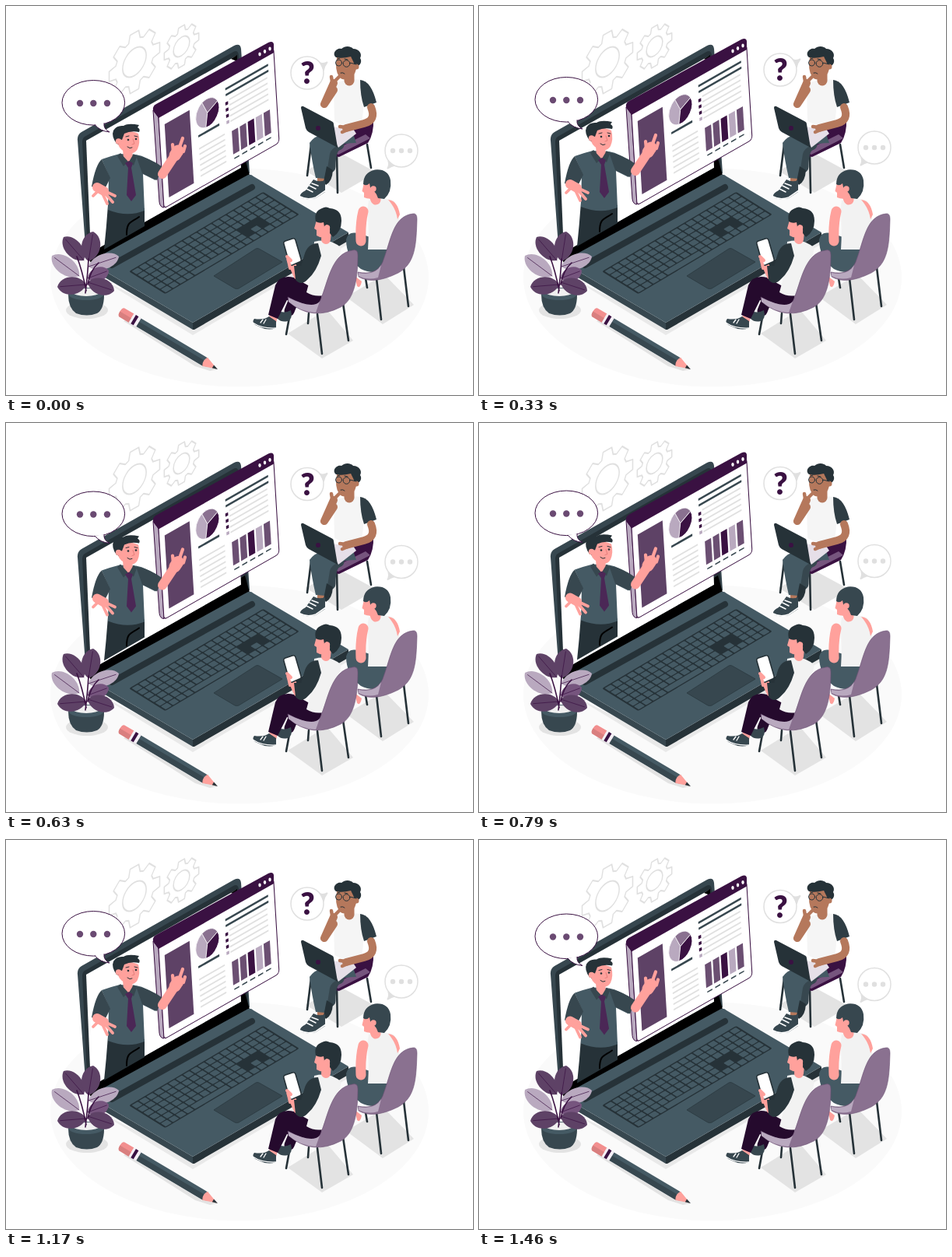
These frames come from a looping animation (600x500 px, 1500 ms). An HTML page:

```html
<!DOCTYPE html>
<html lang="en">
<head>
<meta charset="utf-8">
<title>Online presentation</title>
<style>
html, body { margin: 0; height: 100%; overflow: hidden; background: #fff; }
svg { display: block; width: 600px; height: 500px; }
.line { fill: none; stroke-linecap: round; stroke-linejoin: round; }
.skin { stroke: #ffa19c; }
.brown { stroke: #b5785c; }
.leg { stroke: #263238; stroke-width: 2.6; }
.grey { stroke: #e0e0e0; }
</style>
</head>
<body>
<svg viewBox="0 0 600 500">
  <ellipse cx="300" cy="349" rx="243" ry="140.5" fill="#fafafa"/>

  <!-- floor shadows -->
  <g fill="#e3e3e3">
    <path d="M385 212L428 188L476 214L431 240Z"/>
    <path d="M437 374L486 345L524 384L484 409Z"/>
    <path d="M362 421L412 390L446 430L406 453Z"/>
    <path d="M120 350L240 423L440 306V298L240 410Z" opacity=".7"/>
    <ellipse cx="104" cy="391" rx="27" ry="11"/>
    <path d="M151 405L163 400L272 467L262 469L243 463Z"/>
  </g>

  <g id="gears" class="line grey" stroke-width="1.800"></g>

  <!-- laptop -->
  <path d="M92 173Q91 166 97 162L293 51Q301 47 302 55L313 215L103 322Z" fill="#37474f"/>
  <path d="M98 175Q98 170 101 168L292 59Q298 56 299 63L311 212L105 323Z" fill="#263238"/>
  <path d="M103 173L296 64L302 208L109 317Z" fill="#fff"/>
  <path d="M289 68L297 63V71Z" fill="#000"/>
  <path d="M109 317L302 208V199L307 196L313 218V224L112 335L105 323Z" fill="#000"/>
  <path d="M117 335L240 407V416L122 346Z" fill="#37474f"/>
  <path d="M240 407L440 291V299Q440 302 436 304L242 416H240Z" fill="#263238"/>
  <path d="M117 335L112 326L311 217Q315 216 318 219L440 291L240 407Z" fill="#455a64"/>
  <path d="M136 333L316 233" class="line" stroke="#263238" stroke-width="8"/>
  <g id="keys" transform="matrix(1.133 -.673 .75 .467 160 341)">
    <rect x="-1" y="-1" width="152" height="62" rx="2" fill="#263238"/>
  </g>
  <path d="M267 347L321 312Q323 311 325 312L355 329L299 363Q297 364 294 363Z" fill="#37474f" stroke="#2e3d44"/>

  <!-- floating window and presenter -->
  <g class="float">
    <path d="M189 134L196 143L203 259Q198 259 197 252Z" fill="#b9a9bf" stroke="#3a1142"/>
    <g id="window" transform="matrix(1 -.57 .06 1 196 143)">
      <path d="M0 -1H148V112Q148 117 143 117H4Q0 117 0 113Z" fill="#fff" stroke="#3a1142"/>
      <rect x="7" y="13" width="32" height="94" fill="#5e4266"/>
      <g transform="translate(61 29) scale(1 1.18)" stroke="#fff" stroke-width=".7">
        <circle r="15" fill="#b9a9bf"/>
        <path d="M0 0L-6 -13.7A15 15 0 0 1 13.500 -6.500Z" fill="#8a7190"/>
        <path d="M0 0L13.500 -6.500A15 15 0 0 1 -3 14.700Z" fill="#3a1142"/>
      </g>
      <path d="M48 52H75M85 12.500H140M85 20H140" stroke="#37474f" stroke-width="2.800"/>
    </g>
    <path d="M189 134Q188 129 193 126L337 47Q343 44 344 49V60L196 144Z" fill="#3a1142"/>
    <g fill="#fff"><ellipse cx="326" cy="62" rx="1.700" ry="2.400"/><ellipse cx="332.500" cy="58.500" rx="1.700" ry="2.400"/><ellipse cx="339" cy="55" rx="1.700" ry="2.400"/></g>

    <path d="M131 256L178 260V283L126 313Q129 285 131 256Z" fill="#263238"/>
    <path d="M155 294C155 277 160 279 171 271" class="line" stroke="#000" stroke-width="2"/>
    <path d="M123 197Q134 193 146 190L167 191Q181 193 199 208L192 224L176 216L178 263Q156 272 131 262L132 218Z" fill="#455a64"/>
    <path d="M167 192Q185 195 201 207L194 224L175 215ZM123 197Q115 204 110 232L126 237L134 221Z" fill="#37474f"/>
    <g class="line skin">
      <path d="M201 216L219 189" stroke-width="12"/>
      <path d="M217 192L221 186" stroke-width="15"/>
      <path d="M222 184L227 170M215 188L214 178M228 187L230 180" stroke-width="4.200"/>
      <path d="M117 233L126 238" stroke-width="12"/>
      <path d="M125 237L140 244M125 238L137 252M123 239L130 254M117 239L112 244" stroke-width="3.800"/>
      <path d="M156 184L157 195" stroke-width="12"/>
    </g>
    <path d="M144 164Q155 157 170 164Q173 175 169 184Q165 191 157 189Q147 186 144 178Z" fill="#ffa19c"/>
    <path d="M142 177Q135 167 138 160Q142 153 151 154Q157 150 171 153L169 156Q173 158 171 162Q160 160 152 164L149 172L145 171L145 178Z" fill="#263238"/>
    <circle cx="144.500" cy="174" r="3.700" fill="#ffa19c"/>
    <g fill="#263238"><circle cx="157" cy="172" r="1.300"/><circle cx="167" cy="171" r="1.300"/></g>
    <path d="M154 168L158 167M165 167L169 168M156 181Q159 184 162 182" class="line" stroke="#263238"/>
    <path d="M163 171L165 177L162 178" class="line" stroke="#e57f7c"/>
    <path d="M147 189L157 200L151 206L143 193ZM164 190L158 200L164 205L168 194Z" fill="#37474f"/>
    <path d="M153 202L158 199L163 202L161 208L167 243L161 251L155 243L157 208Z" fill="#4b2756"/>

    <ellipse cx="112.300" cy="124.300" rx="40.300" ry="28.800" fill="#fff" stroke="#3a1142"/>
    <path d="M114 152.500Q121 161 133 162Q125 158 126 150.500" fill="#fff" stroke="#3a1142"/>
    <g fill="#6a4a72"><circle cx="95" cy="125" r="4.200"/><circle cx="112.300" cy="125" r="4.200"/><circle cx="130" cy="125" r="4.200"/></g>
  </g>

  <!-- questioner with laptop -->
  <path d="M392 178L387 218M425 190L426 240M464 178L469 208" class="line leg"/>
  <path d="M455 151L472 145Q473 164 465 176L428 194Q419 193 417 186Z" fill="#3a1142"/>
  <path d="M418 187L462 165L468 170L427 191Z" fill="#76557e"/>
  <path d="M427 178Q416 180 416 207" class="line" stroke="#37474f" stroke-width="15"/>
  <path d="M405 215V226" class="line brown" stroke-width="10"/>
  <path d="M390 176Q396 167 410 164L446 164L450 176Q420 176 416 190L411 222L398 221Q393 200 390 176Z" fill="#455a64"/>
  <path d="M412 206L420 211Q419 226 411 230L408 226Z" fill="#263238"/>
  <path d="M395 223Q402 227 410 224V239L398 247Q382 250 378 245Q377 241 385 237Z" fill="#37474f"/>
  <path d="M378 245Q387 250 398 246L411 237M386 235L394 239M390 231L398 235M393 228L401 231" class="line" stroke="#fff" stroke-width="1.600"/>
  <path d="M421 101Q435 92 456 95Q462 122 457 150Q440 158 422 148Z" fill="#f5f5f5"/>
  <path d="M455 95Q469 96 476 124L460 130Q455 115 455 95Z" fill="#2f3d44"/>
  <path d="M413 155L446 158L450 164L427 182Z" fill="#e6dfe8"/>
  <path d="M379 131Q379 128 382 129L418 148Q421 149 421 152L426 182L389 162Q386 160 385 157Z" fill="#263238"/>
  <circle cx="401" cy="157" r="3" fill="#3a1142"/>
  <g class="line brown">
    <path d="M469 130Q476 147 460 151L437 157" stroke-width="10"/>
    <path d="M437 156L429 155M439 159L432 162" stroke-width="4.500"/>
    <path d="M421 108L409 126L421 99" stroke-width="10"/>
    <path d="M420 99L428 91M419 97L418 91" stroke-width="4.500"/>
    <path d="M441 87L441 96" stroke-width="13"/>
  </g>
  <path d="M425 66Q437 60 449 68Q453 82 445 91Q434 98 428 91Q422 82 425 66Z" fill="#b5785c"/>
  <path d="M424 66C418 61 425 53 431 55C436 50 444 52 446 55C454 55 458 62 455 67C459 73 452 79 449 78L446 71L443 65Q432 68 424 66Z" fill="#263238"/>
  <circle cx="450" cy="78" r="3.500" fill="#b5785c"/>
  <g class="line" stroke="#263238"><circle cx="427.500" cy="73" r="4"/><circle cx="437.500" cy="74" r="4.300"/><path d="M442 73L450 75M426 68L429 67M435 68L439 69M430 86Q433 85 435 87"/></g>

  <!-- seated woman -->
  <path d="M476 350L482 403M511 336L517 386M462 350L464 362" class="line leg"/>
  <path d="M448 347L451 360Q455 364 457 354Z" fill="#ffa19c"/>
  <path d="M437 300Q440 288 455 293L493 305L490 338Q472 346 456 338Q437 324 437 300Z" fill="#455a64"/>
  <path d="M466 250Q485 244 499 251Q507 263 504 287L490 313H465Q467 283 464 264Z" fill="#f2f2f2"/>
  <path d="M459 264Q455 280 456 302M472 241L475 249" class="line skin" stroke-width="13"/>
  <path d="M491 249Q503 250 506 268L503 274Q501 260 491 249Z" fill="#ffa19c"/>
  <path d="M460 227L457.500 238L460 240V246Q466 249 474 247L480 235L471 224Z" fill="#ffa19c"/>
  <path d="M459 229Q459 214 474 210.500Q491 209 494 224Q496 239 486 248L478 247Q476 241 473 238L468 233L467 228Q463 232 459 229Z" fill="#37474f"/>
  <circle cx="472" cy="235" r="3.700" fill="#ffa19c"/>
  <path d="M452 342Q476 347 484 329C495 300 497 270 523 267Q528 266 528 274C527 307 526 331 504 343Q472 359 453 348Z" fill="#8a7190" stroke="#6b4f72" stroke-width=".6"/>
  <path d="M453 343Q474 347 482 333L478 349Q464 353 453 347Z" fill="#b9a9bf"/>

  <!-- seated man with phone -->
  <path d="M367 384L360 422M400 396L406 447M433 382L440 430M389 395L388 408" class="line leg"/>
  <path d="M377 360L364 392" class="line" stroke="#250a2d" stroke-width="13"/>
  <path d="M349 391Q356 396 366 391Q369 402 362 405Q354 407 349 402Z" fill="#37474f"/>
  <path d="M338 400L342 390L351 393L347 407Z" fill="#ffa19c"/>
  <path d="M406 369L370 349Q352 345 346 359L337 397L349 402L361 378L392 389Q405 388 406 369Z" fill="#250a2d"/>
  <path d="M319 402Q331 404 338 399L347 405V414Q336 418 325 412Q314 408 319 402Z" fill="#37474f"/>
  <path d="M317 407Q329 415 347 414M330 403L327 407M334 403L331 408" class="line" stroke="#fff" stroke-width="1.300"/>
  <path d="M396 303Q416 298 431 311L424 340L407 372Q396 374 386 368Q395 340 396 303Z" fill="#f2f2f2"/>
  <path d="M374 347L365 326" class="line skin" stroke-width="9"/>
  <path d="M401 305Q387 305 383 321L379 334L370 334L372 352Q379 360 387 352Q399 342 405 321Z" fill="#2a373d"/>
  <path d="M357 306Q356 303 359 302L368 299Q371 298 372 301L379 325Q380 328 377 329L368 333Q365 334 364 331Z" fill="#fff" stroke="#263238" stroke-width="1.600"/>
  <path d="M361 322L366 327M365 337L362 323" class="line skin" stroke-width="4"/>
  <path d="M412 290L411 300" class="line skin" stroke-width="12"/>
  <path d="M399 275L396 286L399 288V295Q405 299 412 298L420 290L418 272Z" fill="#ffa19c"/>
  <path d="M398 277Q395 264 406 260Q411 257 416 260Q431 261 431 276Q431 290 420 297L416 292Q417 283 412 281L409 284L408 278Q403 280 398 277Z" fill="#263238"/>
  <circle cx="412.500" cy="285" r="3.700" fill="#ffa19c"/>
  <path d="M362 374Q397 393 404 378C414 354 418 318 445 314Q452 312 452 320C452 346 449 377 430 387Q393 406 363 380Z" fill="#8a7190" stroke="#6b4f72" stroke-width=".6"/>
  <path d="M363 375Q394 390 403 380L398 394Q378 393 363 380Z" fill="#b9a9bf"/>

  <!-- plant -->
  <path d="M80 371H126Q126 390 117 395Q104 400 90 395Q80 388 80 371Z" fill="#37474f"/>
  <ellipse cx="103" cy="370" rx="23" ry="8" fill="#455a64"/>
  <ellipse cx="103" cy="368" rx="17" ry="5" fill="#f0f0f0"/>
  <g id="leaves"></g>
  <path d="M102 369Q105 345 106 325M103 366Q98 340 91 322M105 358Q108 340 119 330" class="line" stroke="#3a1142" stroke-width="1.600"/>

  <!-- pencil -->
  <g transform="translate(149 394) rotate(30.700)">
    <path d="M20 -6H124L140 0L124 6H20Z" fill="#455a64"/>
    <path d="M20 -1H127L124 6H20Z" fill="#37474f"/>
    <path d="M0 -6.500H14V6.500H0Q-3 6 -3 0Q-3 -6 0 -6.500Z" fill="#f28f8f"/>
    <path d="M-3 0H14V6.500H0Q-3 6 -3 0Z" fill="#d97f7f"/>
    <path d="M14 -6.500H25V6.500H14Z" fill="#f5f0f6"/>
    <path d="M17 -6.500H21V6.500H17Z" fill="#3a1142"/>
    <path d="M124 -6.500L142 0L124 6.500Q120 0 124 -6.500Z" fill="#ffa19c"/>
    <path d="M136 -2.200L143 0L136 2.200Z" fill="#263238"/>
  </g>

  <!-- thought bubbles -->
  <g class="float" fill="#fff" stroke="#e0e0e0" stroke-width="1.500">
    <circle cx="387" cy="86" r="21"/>
    <path d="M403 73Q408 75 413 72Q409 77 408 83" fill="#e0e0e0"/>
    <text x="387.500" y="100" font-family="Lato, sans-serif" font-weight="900" font-size="39" text-anchor="middle" fill="#3a1142" stroke="none">?</text>
    <circle cx="508" cy="186" r="21"/>
    <path d="M491 199Q493 204 490 209Q495 206 499 205" fill="#e0e0e0"/>
    <g fill="#e0e0e0" stroke="none"><circle cx="497" cy="186" r="3.200"/><circle cx="508" cy="186" r="3.200"/><circle cx="519" cy="186" r="3.200"/></g>
  </g>
</svg>
<script>
const add = (id, markup) => document.getElementById(id).insertAdjacentHTML('beforeend', markup);
const range = n => [...Array(n).keys()];

function gear(cx, cy, r) {
  const points = range(8).flatMap(i => [[-.3, .76], [-.17, 1], [.17, 1], [.3, .76]].map(([a, k]) => {
    const angle = i * Math.PI / 4 + a;
    return [Math.cos(angle) * r * k, Math.sin(angle) * r * k].map(v => v.toFixed(1));
  }));
  add('gears', `<g transform="matrix(.866 -.5 0 1 ${cx} ${cy})"><path d="M${points.join('L')}Z"/><circle r="${r * .46}"/></g>`);
}
gear(165, 72, 38);
gear(225.5, 52, 26);

const pitch = 150 / 18;
const key = (col, row, span = 1) => add('keys',
  `<rect x="${col * pitch + .7}" y="${row * 10 + .8}" width="${span * pitch - 1.4}" height="8.500" rx="1" fill="#455a64"/>`);
for (const row of range(6)) for (const col of range(18)) {
  const blank = col > 11 && col < 15 && (row === 3 || row === 4 && col !== 13);
  const space = row === 5 && col > 3 && col < 9;
  if (!blank && !space) key(col, row);
}
key(4, 5, 5);

const rule = (x, y, w, color, size = 2) =>
  add('window', `<rect x="${x}" y="${y}" width="${w}" height="${size}" fill="${color}"/>`);
for (const i of range(6)) rule(48, 67 + i * 7, 33, '#e0e0e0');
for (const i of range(5)) rule(89, 27 + i * 7, 49, '#e0e0e0');
['#3a1142', '#3a1142', '#3a1142', '#b9a9bf'].forEach((color, i) => rule(84, 29 + i * 8, 3.5, color, 4));
['#6b4f72', '#6b4f72', '#3a1142', '#b9a9bf', '#6b4f72'].forEach((color, i) => {
  rule(90 + i * 10.2, 69, 8, color, 30);
  rule(91 + i * 10.2, 104, 6.5, '#37474f', 1.7);
});

function leaf(x, y, tipX, tipY, width, color) {
  const dx = tipX - x, dy = tipY - y, length = Math.hypot(dx, dy);
  const control = (along, s) =>
    `${x + dx * along - s * dy / length * width} ${y + dy * along + s * dx / length * width}`;
  add('leaves', `<path d="M${x} ${y}C${control(.2, 1)} ${control(.85, 1)} ${tipX} ${tipY}C${control(.85, -1)} ${control(.2, -1)} ${x} ${y}" fill="${color}"/>
    <path d="M${x} ${y}L${x + dx * .9} ${y + dy * .9}" class="line" stroke="#3a1142" stroke-width=".7"/>`);
}
const dark = '#5e4266', mid = '#76557e', light = '#b9a9bf';
leaf(100, 327, 74, 297, 14, dark);
leaf(106, 328, 112, 290, 16, dark);
leaf(94, 347, 59, 321, 15, light);
leaf(106, 335, 145, 322, 13, light);
leaf(105, 350, 132, 340, 12, mid);
leaf(103, 358, 66, 361, 15, dark);
leaf(105, 355, 139, 366, 14, dark);

// Linear bob, stepped at 24 frames per second
const floats = document.querySelectorAll('.float');
function draw(now) {
  const step = Math.floor(now * .024 + .1) % 36;
  const lift = 9 * (1 - Math.abs(step / 18 - 1));
  floats.forEach(el => el.setAttribute('transform', `translate(0 ${-lift})`));
  requestAnimationFrame(draw);
}
draw(performance.now());
</script>
</body>
</html>
```
